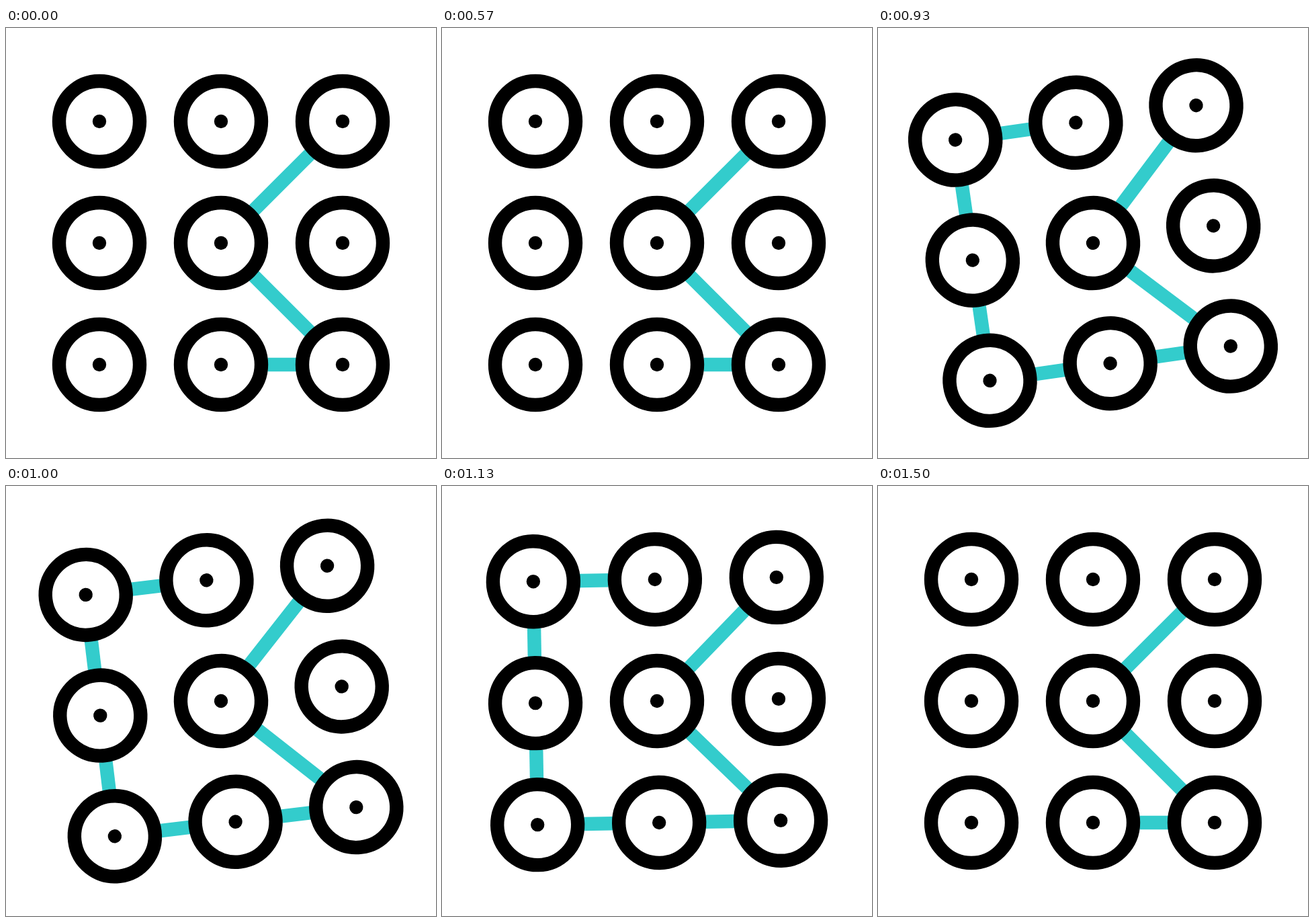
These frames come from a looping animation (640 px wide and 640 px high, 1.67 s). An HTML page with a canvas:

```html
<!DOCTYPE html>
<html lang="en">
<head>
<meta charset="utf-8">
<title>Unlock pattern</title>
<style>
  html, body { margin: 0; width: 100%; height: 100%; overflow: hidden; background: #fff; }
  canvas { display: block; width: 640px; height: 640px; }
</style>
</head>
<body>
<canvas id="stage"></canvas>
<script>
const LOOP = 1670, FPS = 30, SIZE = 640;
const GAP = 181, RADIUS = 60, STROKE = 20.4;

// Grid steps from the centre, in the order the pattern is drawn.
const route = [[1, -1], [0, 0], [1, 1], [0, 1], [-1, 1], [-1, 0], [-1, -1], [0, -1]];
const RESTING = 3; // segments visible at rest

// Times in ticks of 1/30 s, one span per segment; erasing runs backwards.
const draw = [[8, 11], [11, 14], [14, 17], [18, 20], [20, 23], [24, 26], [26, 28]];
const erase = [[6, 8], [4, 6], [2, 4], [43, 45], [41, 43], [39, 41], [37, 39]];
const swing = [[26, 0], [29, -11], [32, 5], [35, -3.1], [40, 0]];

const canvas = document.getElementById('stage');
const ctx = canvas.getContext('2d');
const ratio = window.devicePixelRatio || 1;
canvas.width = canvas.height = SIZE * ratio;

const ramp = (t, [from, to]) => Math.min(1, Math.max(0, (t - from) / (to - from)));
const smooth = u => u * u * (3 - 2 * u);

function angleAt(t) {
  for (let i = 1; i < swing.length; i++) {
    const [t0, a0] = swing[i - 1], [t1, a1] = swing[i];
    if (t >= t0 && t < t1) return a0 + (a1 - a0) * smooth((t - t0) / (t1 - t0));
  }
  return 0;
}

const shownPart = (i, t) => (i < RESTING ? 1 : 0) + ramp(t, draw[i]) - ramp(t, erase[i]);

function segment(i, part) {
  if (part <= 0) return;
  const [c0, r0] = route[i], [c1, r1] = route[i + 1];
  const dx = c1 - c0, dy = r1 - r0, x = c0 * GAP, y = r0 * GAP;
  const inset = dx && dy ? 42 : 69.4;
  const reach = inset + (GAP - 2 * inset) * part;

  ctx.save();
  ctx.beginPath();
  ctx.rect(dx ? x : x - STROKE, dy ? y : y - STROKE,
           dx ? dx * reach : 2 * STROKE, dy ? dy * reach : 2 * STROKE);
  ctx.clip();
  ctx.beginPath();
  ctx.moveTo(x, y);
  ctx.lineTo(x + dx * GAP, y + dy * GAP);
  ctx.strokeStyle = '#33cccc';
  ctx.stroke();
  ctx.restore();
}

function disc(x, y, r, color) {
  ctx.beginPath();
  ctx.arc(x, y, r, 0, Math.PI * 2);
  ctx.fillStyle = color;
  ctx.fill();
}

function node(x, y) {
  disc(x, y, RADIUS, '#fff');
  ctx.strokeStyle = '#000';
  ctx.stroke();
  disc(x, y, STROKE / 2, '#000');
}

function render(t) {
  ctx.setTransform(ratio, 0, 0, ratio, 0, 0);
  ctx.fillStyle = '#fff';
  ctx.fillRect(0, 0, SIZE, SIZE);
  ctx.translate(SIZE / 2, SIZE / 2);
  ctx.rotate(angleAt(t) * Math.PI / 180);
  ctx.lineWidth = STROKE;
  draw.forEach((_, i) => segment(i, shownPart(i, t)));
  for (let row = -1; row <= 1; row++)
    for (let col = -1; col <= 1; col++) node(col * GAP, row * GAP);
}

const start = performance.now();
function tick() {
  const ms = (performance.now() - start) % LOOP;
  render(Math.floor((ms + 4) * FPS / 1000));
  requestAnimationFrame(tick);
}
tick();
</script>
</body>
</html>
```
